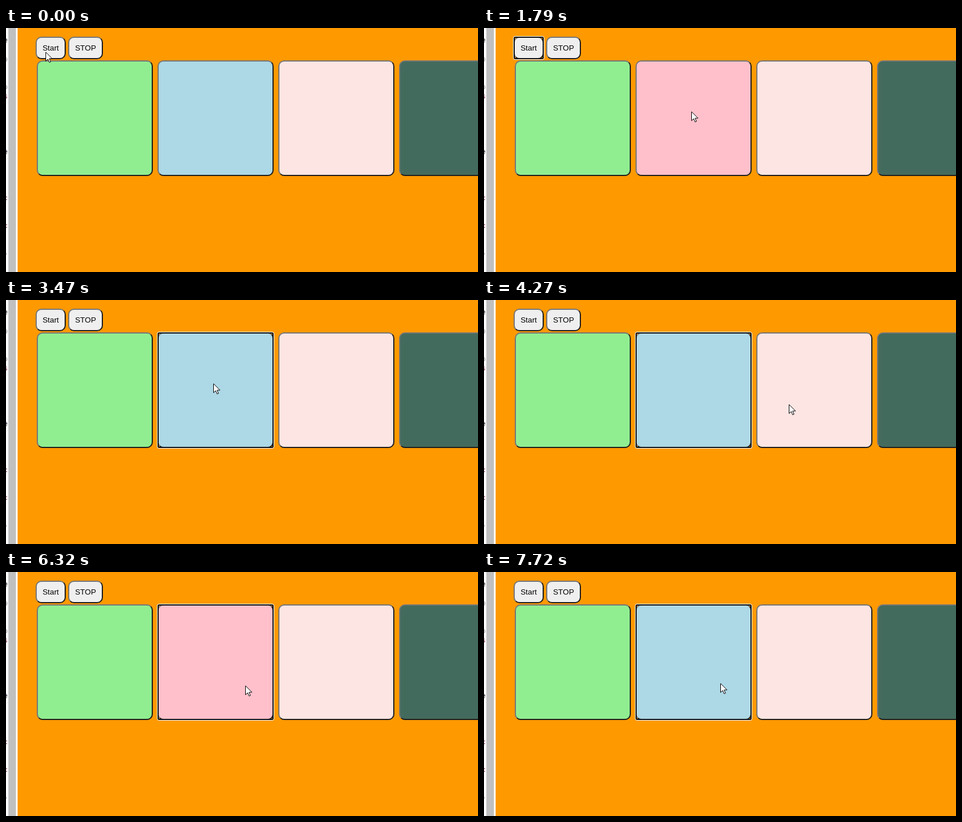
These frames come from a looping animation (813x422 px, 8000 ms). An HTML page:

```html
<!DOCTYPE html>
<html lang="en">
<head>
<meta charset="utf-8">
<title>Colour toggle</title>
<style>
  html, body { margin: 0; width: 100%; height: 100%; overflow: hidden; }
  body { background: #f90; }
  #stage { position: relative; width: 813px; height: 422px; overflow: hidden; background: #f90; }
  #stage * { box-sizing: border-box; }
  .btn, .box, .ring, .cursor, .pane, .bar, .pane span { position: absolute; }

  .pane { left: 0; top: 0; width: 4px; height: 100%; background: #fff; overflow: hidden; }
  .pane span { right: 1px; font: 13px/16px "Liberation Mono", monospace; color: #223; }
  .pane .grey { color: #999; }
  .pane .red { color: #834; }
  .bar { left: 4px; top: 0; width: 16px; height: 100%; background: #c0c0c0; border-right: 3px solid #fff; }

  .btn, .box {
    border: 2px solid;
    border-color: #767676 #1e1e1e #1e1e1e #767676;
    border-radius: 10px;
  }
  .btn {
    top: 15px; height: 39px; background: #efefef; color: #000; text-align: center;
    font: 13.333px/35px "Liberation Sans", Arial, sans-serif; white-space: nowrap;
  }
  .box { top: 56px; width: 200px; height: 200px; }
  .ring { border: 2px solid #101010; border-radius: 3px; box-shadow: 0 0 0 1px #fff; }

  .toggle, .ring, .cursor { animation: 8s step-end infinite; }
  .toggle { animation-name: toggle; }
  .ring.start { left: 51px; top: 15px; width: 52px; height: 39px; animation-name: focus-start; }
  .ring.second { left: 261px; top: 56px; width: 200px; height: 200px; animation-name: focus-second; }
  .cursor { left: 0; top: 0; width: 13px; height: 20px; animation-name: point; }

  @keyframes toggle {
    0%, 26%, 43.375%, 68%, 84.125%, 96.5% { background: lightblue; }
    13.5%, 32.75%, 55.25%, 79%, 89.875% { background: pink; }
  }
  @keyframes focus-start {
    0%, 32.75% { visibility: hidden; }
    1.625% { visibility: visible; }
  }
  @keyframes focus-second {
    0% { visibility: hidden; }
    32.75% { visibility: visible; }
  }
  @keyframes point {
    0% { transform: translate(68px, 41px); }
    7% { transform: translate(75px, 50px); }
    8.5% { transform: translate(85px, 62px); }
    10.375% { transform: translate(112px, 70px); }
    11.9375% { transform: translate(152px, 81px); }
    13.5% { transform: translate(191px, 92px); }
    15.375% { transform: translate(214px, 107px); }
    17.375% { transform: translate(234px, 115px); }
    19.25% { transform: translate(275px, 126px); }
    20.8125% { transform: translate(320px, 136px); }
    22.375% { transform: translate(357px, 144px); }
    46.875% { transform: translate(325px, 152px); }
    48.4375% { transform: translate(400px, 164px); }
    50% { transform: translate(475px, 173px); }
    51.5% { transform: translate(525px, 178px); }
    53.375% { transform: translate(525px, 180px); }
    55.25% { transform: translate(515px, 198px); }
    62.75% { transform: translate(507px, 198px); }
    64.625% { transform: translate(490px, 199px); }
    66.125% { transform: translate(472px, 199px); }
    68% { transform: translate(434px, 199px); }
    69.875% { transform: translate(420px, 198px); }
    72% { transform: translate(412px, 196px); }
    86% { transform: translate(409px, 194px); }
    88% { transform: translate(407px, 192px); }
  }
</style>
</head>
<body>
<div id="stage">
  <div class="pane">
    <span style="top:14px">e</span>
    <span class="grey" style="top:47px">o</span>
    <span class="red" style="top:62px">:</span>
    <span class="grey" style="top:95px">o</span>
    <span class="red" style="top:111px">s</span>
    <span style="top:207px">e</span>
    <span style="top:255px">:</span>
    <span class="red" style="top:287px">c</span>
    <span style="top:303px">:</span>
    <span class="red" style="top:335px">c</span>
    <span style="top:383px">-</span>
    <span style="top:411px">:</span>
  </div>
  <div class="bar"></div>

  <div class="btn" style="left:51px;width:52px">Start</div>
  <div class="btn" style="left:107px;width:60px">STOP</div>
  <div class="box" style="left:53px;background:lightgreen"></div>
  <div class="box toggle" style="left:261px"></div>
  <div class="box" style="left:469px;background:#fde5e3"></div>
  <div class="box" style="left:677px;background:#436b5d"></div>

  <div class="ring start"></div>
  <div class="ring second"></div>

  <svg class="cursor" viewBox="0 0 13 20">
    <path d="M.5 .8V16.3L4.2 12.9L6.6 18.5L9 17.5L6.6 12H11.6Z" fill="#fff" stroke="#000"/>
  </svg>
</div>
</body>
</html>
```
